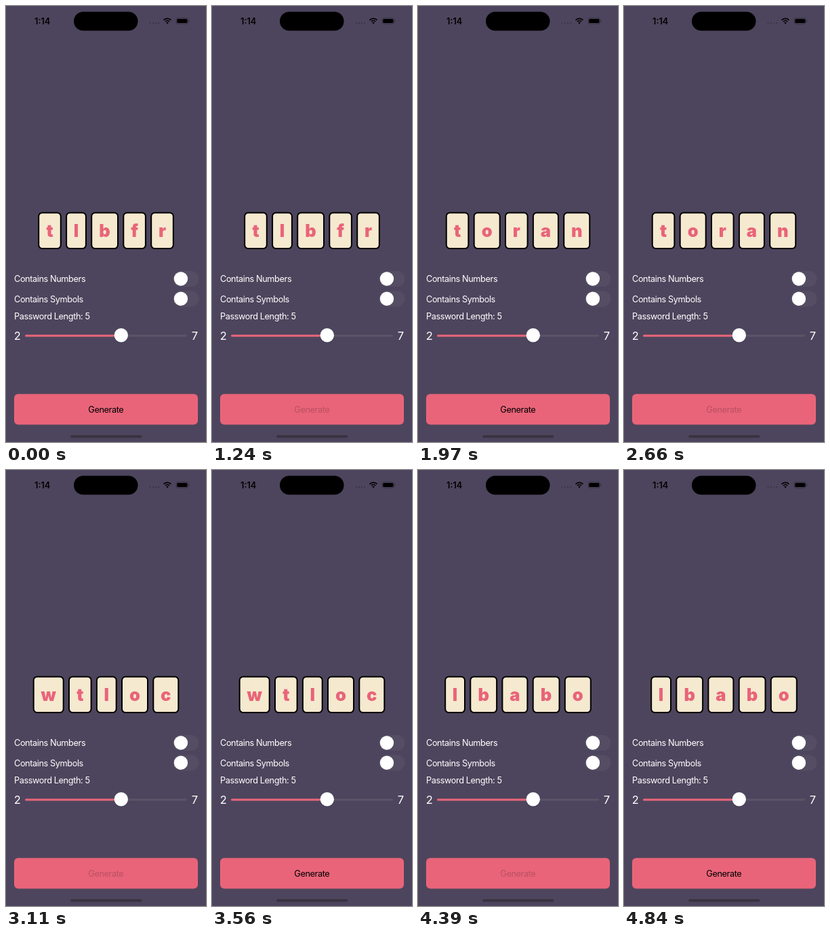
An HTML page for the animation above (4.93 s loop, 295 by 640 pixels).

```html
<!DOCTYPE html>
<html lang="en">
<head>
<meta charset="utf-8">
<title>Password generator</title>
<style>
html, body { margin: 0; width: 100%; height: 100%; overflow: hidden; background: #4d455d; }
svg { display: block; width: 100vw; height: 100vh; }
text { font-family: Inter, Roboto, sans-serif; }
.label { font-size: 12.75px; letter-spacing: -0.42px; fill: #fff; }
.bound { font-size: 16.5px; fill: #fff; }
.card rect { fill: #f5e9cf; stroke: #000; stroke-width: 2; }
.card text { font-size: 25.5px; font-weight: 900; fill: #e96479; text-anchor: middle; }
</style>
</head>
<body>
<svg viewBox="0 0 295 640">
  <rect width="295" height="640" fill="#4d455d"/>

  <!-- status bar -->
  <text x="42" y="26.5" font-size="12.75" font-weight="600">1:14</text>
  <rect x="100" y="8.5" width="94.5" height="27.8" rx="13.9"/>
  <g opacity=".25">
    <circle cx="212.6" cy="25" r="1.1"/><circle cx="216.8" cy="25" r="1.1"/>
    <circle cx="221" cy="25" r="1.1"/><circle cx="225.2" cy="25" r="1.1"/>
  </g>
  <g fill="none" stroke="#000" stroke-width="1.7">
    <path d="M232.5 20.7a7.8 7.8 0 0 1 11 0"/>
    <path d="M234.8 23a4.6 4.6 0 0 1 6.4 0"/>
  </g>
  <path d="M238 26.4l-1.7-1.8a2.4 2.4 0 0 1 3.4 0z"/>
  <rect x="251" y="17.7" width="17.6" height="8.6" rx="2.8" fill="none" stroke="#000" stroke-opacity=".35" stroke-width=".8"/>
  <rect x="252.2" y="18.9" width="15.2" height="6.2" rx="1.7"/>
  <path d="M269.7 20.5a1.7 1.7 0 0 1 0 3z" opacity=".4"/>

  <g id="cards"></g>

  <!-- settings -->
  <text class="label" x="12" y="405">Contains Numbers</text>
  <text class="label" x="12" y="434.5">Contains Symbols</text>
  <text class="label" x="12" y="459.7">Password Length: 5</text>
  <g id="switches"></g>

  <text class="bound" x="11.7" y="489.8">2</text>
  <text class="bound" x="283.2" y="489.8" text-anchor="end">7</text>
  <rect x="28" y="482.4" width="239" height="3" rx="1.5" fill="#787880" fill-opacity=".3"/>
  <rect x="28" y="482.4" width="142" height="3" rx="1.5" fill="#e96479"/>
  <circle cx="169.8" cy="484.4" r="10.6" fill="#000" opacity=".08"/>
  <circle cx="169.8" cy="483.3" r="10.2" fill="#fff"/>

  <!-- button -->
  <rect x="12" y="569.6" width="271" height="44.8" rx="6" fill="#e96479"/>
  <text id="action" class="label" x="147.3" y="596.8" text-anchor="middle" style="fill:#000">Generate</text>

  <rect x="95.3" y="630" width="105" height="3.8" rx="1.9" fill="#39323f"/>
</svg>
<script>
const NS = "http://www.w3.org/2000/svg";
const LOOP = 4930;
const GAP = 6.3;
const DIM = 0.2;
const WIDTHS = { t: 34.6, l: 30.8, b: 40.8, f: 34.6, r: 34.6, o: 40, a: 39, n: 40, w: 46, c: 39 };
// Each tap: finger down, finger up, label fully restored, resulting word
const TAPS = [
  { down: 1240, up: 1540, end: 1970, word: "toran" },
  { down: 2660, up: 3110, end: 3560, word: "wtloc" },
  { down: 4150, up: 4390, end: 4840, word: "lbabo" }
];
const FIRST = "tlbfr";
const cards = document.getElementById("cards");
const action = document.getElementById("action");
let shown = "";

function add(parent, tag, attrs) {
  const el = document.createElementNS(NS, tag);
  for (const key in attrs) el.setAttribute(key, attrs[key]);
  return parent.appendChild(el);
}

function showWord(word) {
  if (word === shown) return;
  shown = word;
  cards.replaceChildren();
  const total = [...word].reduce((sum, c) => sum + WIDTHS[c], GAP * (word.length - 1));
  let x = 147.5 - total / 2;
  for (const c of word) {
    const w = WIDTHS[c];
    const card = add(cards, "g", { class: "card" });
    add(card, "rect", { x: x + 1, y: 303.4, width: w - 2, height: 52.6, rx: 5.2 });
    add(card, "text", { x: x + w / 2, y: 339 }).textContent = c;
    x += w + GAP;
  }
}

// The label recovers in four visible steps along an ease-in-out curve
function labelOpacity(t, tap) {
  if (t < tap.up) return DIM;
  const p = Math.min(1, Math.floor(4 * (t - tap.up) / (tap.end - tap.up)) / 4);
  return DIM + (1 - DIM) * p * p * (3 - 2 * p);
}

function draw(t) {
  let word = FIRST, opacity = 1;
  for (const tap of TAPS) {
    if (t >= tap.down) opacity = labelOpacity(t, tap);
    if (t >= tap.up) word = tap.word;
  }
  showWord(word);
  action.setAttribute("fill-opacity", opacity);
}

const switches = document.getElementById("switches");
for (const y of [400.5, 429.8]) {
  add(switches, "rect", { x: 246.2, y: y - 11.6, width: 38.3, height: 23.2, rx: 11.6, fill: "#787880", "fill-opacity": 0.16 });
  add(switches, "circle", { cx: 257.9, cy: y + 0.8, r: 10.5, fill: "#000", opacity: 0.06 });
  add(switches, "circle", { cx: 257.9, cy: y, r: 10.2, fill: "#fff" });
}

function tick() {
  draw(performance.now() % LOOP);
  requestAnimationFrame(tick);
}
tick();
</script>
</body>
</html>
```
